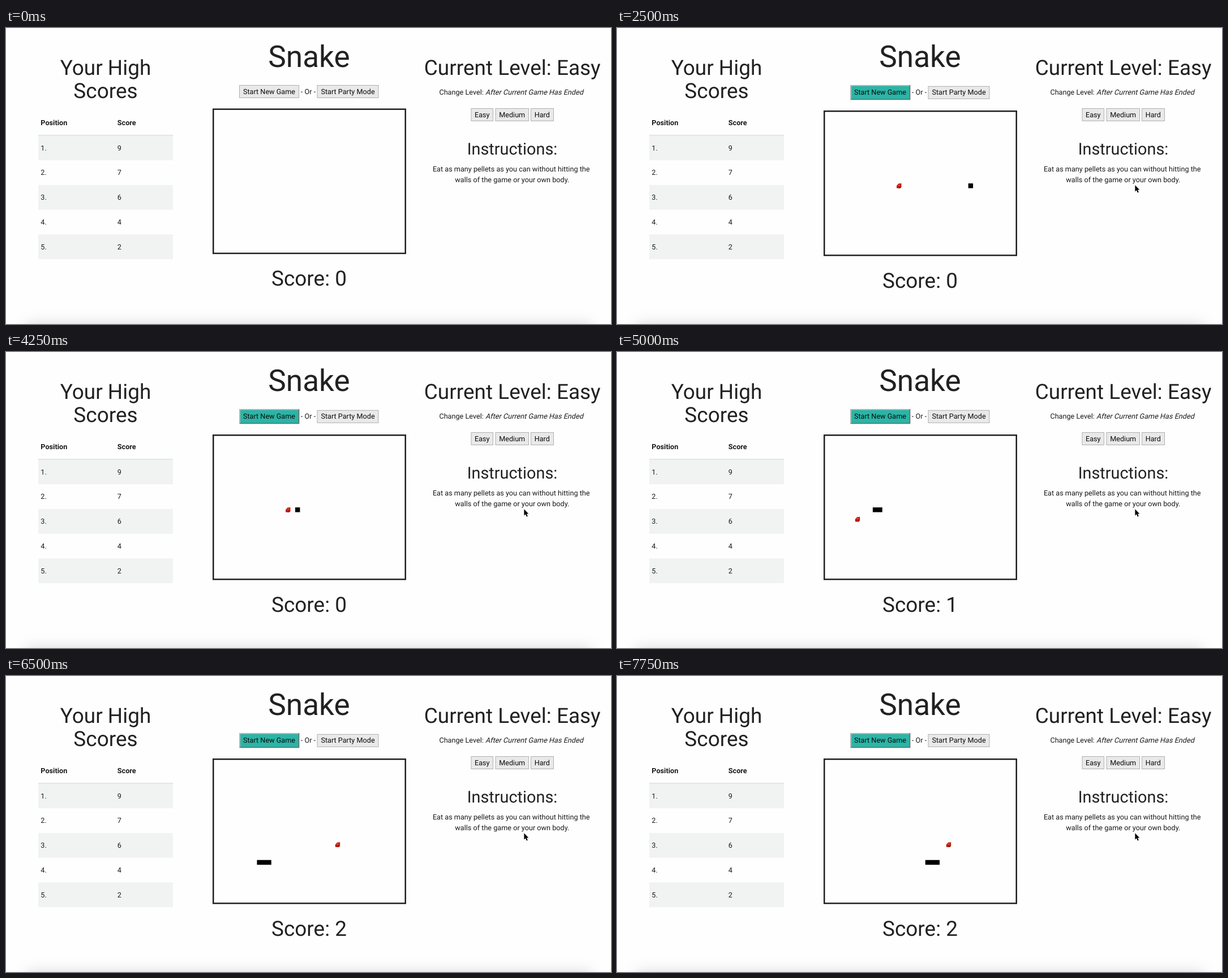
Write an HTML page that moves like this. It is 1069 px wide and 524 px high and loops after 8 s.

```html
<!DOCTYPE html>
<html lang="en">
<head>
<meta charset="utf-8">
<title>Snake</title>
<style>
  html, body { margin: 0; width: 100%; height: 100%; overflow: hidden; background: #fefefe; }
  svg { display: block; width: 100%; height: 100%; overflow: hidden; }
  text { font: 12.66px Roboto, sans-serif; fill: #1a1a1a; text-rendering: geometricPrecision; }
  .mid text { text-anchor: middle; }
  .mid .from { text-anchor: start; }
  .mid .h1 { font-size: 53.2px; }
  .mid .h3 { font-size: 36.97px; }
  .mid .h4 { font-size: 28.87px; }
  .h1, .h3, .h4 { fill: #212121; }
  .bold { font-weight: 700; }
  .stripe { fill: #f1f2f2; }
  .button rect { fill: #e9e9e9; stroke: #b0b0b0; }
  .button text { fill: #0c0c0c; }
  #start.active rect { fill: #2ab5a6; stroke: #66706f; stroke-width: 1.7; }
  #bevel { display: none; fill: none; stroke: #b4bbba; stroke-width: 1.7; }
  .active #bevel { display: inline; }
  #snake { fill: none; stroke: #000; stroke-width: 8.44; stroke-linecap: square; }
</style>
</head>
<body>
<svg viewBox="0 0 1069 524" preserveAspectRatio="xMinYMin">
  <filter id="blur" x="-10%" y="-100%" width="120%" height="300%"><feGaussianBlur stdDeviation="12"/></filter>
  <rect x="36" y="524" width="998" height="60" fill-opacity=".15" filter="url(#blur)"/>

  <g id="table"></g>
  <g class="mid">
    <text class="h3" x="176" y="83.2">Your High</text>
    <text class="h3" x="176" y="123.8">Scores</text>

    <text class="h1" x="535.5" y="68.7">Snake</text>
    <g id="start" class="button">
      <rect x="412.5" y="101.5" width="105" height="22"/>
      <path id="bevel" d="M413.3 126V101.8H517"/>
      <text x="465" y="116.5">Start New Game</text>
    </g>
    <g id="inline">
      <text x="534" y="116.5">- Or -</text>
      <g class="button">
        <rect x="550" y="101.5" width="108" height="22"/>
        <text x="604" y="116.5">Start Party Mode</text>
      </g>
    </g>
    <g id="game">
      <rect x="366.25" y="143.75" width="339.5" height="255.2" fill="none" stroke="#1e1e1e" stroke-width="2.5"/>
      <text id="score" class="h3" x="535.5" y="456.1">Score: 0</text>
    </g>

    <text class="h3" x="894.7" y="83.2">Current Level: Easy</text>
    <text class="from" x="765.4" y="118.4">Change Level:</text>
    <text class="from" transform="translate(847 118.4) skewX(-14)">After Current Game Has Ended</text>
    <g class="button"><rect x="822" y="142.5" width="38.5" height="22"/><text x="841.3" y="157.8">Easy</text></g>
    <g class="button"><rect x="865" y="142.5" width="58.5" height="22"/><text x="894.2" y="157.8">Medium</text></g>
    <g class="button"><rect x="927.5" y="142.5" width="40" height="22"/><text x="947.3" y="157.8">Hard</text></g>
    <text class="h4" x="894.5" y="223.7">Instructions:</text>
    <text x="892.7" y="254">Eat as many pellets as you can without hitting the</text>
    <text x="894.3" y="272.6">walls of the game or your own body.</text>
  </g>

  <g id="pellet">
    <path d="M-4.2 4.2V0L-1-3.8 4.2-4.2V2L2.4 4.2Z" fill="#bd1a0c"/>
    <path d="M-3.4 4.2L1 3.2 4.2 2 2.4 4.2Z" fill="#7d1008"/>
    <path d="M-1.6-.6L1.8-1.6" stroke="#e8796c" stroke-width="1.1"/>
  </g>
  <path id="snake"/>
  <path id="cursor" d="M0 0V11.3L2.6 9 4.5 13.3 6.4 12.4 4.6 8.2H8Z" stroke="#fff" stroke-width="1" paint-order="stroke"/>
</svg>
<script>
const LOOP = 8000, STEP = 250, CELL = 8.44;
const FIELD = { x: 367.5, y: 148.5 };
const HOVER_AT = 750, GAME_AT = 1750, MOVE_AT = 3000;
const FIRST_MEAL = 15, SECOND_MEAL = 26;
const cursorStops = [
  [500, 501, 77], [750, 504, 95], [1000, 506.3, 102.8], [1250, 508, 112],
  [2000, 640, 165], [2250, 850, 250], [2500, 915.4, 278.3]
];
const pellets = [[498.3, 279.3], [425, 296], [586, 298.5]];
const el = id => document.getElementById(id);

function buildTable() {
  const top = 190.3, pitch = 43.8;
  const cells = (y, a, b, cls = '') =>
    `<text class="${cls}" x="61.3" y="${y}">${a}</text><text class="${cls}" x="196.8" y="${y}">${b}</text>`;
  const rows = [9, 7, 6, 4, 2].map((score, i) => {
    const y = top + i * pitch;
    const stripe = i % 2 ? '' : `<rect class="stripe" x="57" y="${y}" width="238" height="${pitch}"/>`;
    return stripe + cells(y + 26.3, `${i + 1}.`, score);
  });
  el('table').innerHTML = cells(172, 'Position', 'Score', 'bold') + rows.join('') +
    '<rect x="57" y="189.3" width="238" height="1" fill="#d2d3d3"/>';
}

// The route runs left, then down, then right.
function routePoint(i) {
  const [col, row] = i <= 24 ? [30 - i, 15] : i <= 30 ? [6, i - 9] : [i - 24, 21];
  return `${FIELD.x + (col + .5) * CELL} ${FIELD.y + (row + .5) * CELL}`;
}

function place(node, x, y) {
  node.setAttribute('transform', `translate(${x} ${y})`);
}

function show(node, visible) {
  node.style.display = visible ? '' : 'none';
}

function render(time) {
  const t = Math.floor(time % LOOP / STEP) * STEP;
  const hovered = t >= HOVER_AT, playing = t >= GAME_AT;

  const start = el('start'), box = start.querySelector('rect');
  start.classList.toggle('active', hovered);
  box.setAttribute('x', hovered ? 413.3 : 412.5);
  box.setAttribute('y', hovered ? 101.8 : 101.5);
  box.setAttribute('width', hovered ? 104.2 : 105);
  box.setAttribute('height', hovered ? 24.6 : 22);
  start.querySelector('text').setAttribute('y', hovered ? 118.3 : 116.5);
  place(el('inline'), 0, hovered ? 1.8 : 0);
  place(el('game'), 0, hovered ? 3.5 : 0);

  const stop = cursorStops.filter(s => s[0] <= t).pop();
  show(el('cursor'), stop);
  if (stop) place(el('cursor'), stop[1], stop[2]);

  const moved = t < MOVE_AT ? 0 : Math.floor(13.6 + 2.43 * (t - 4250) / STEP);
  const score = (moved >= FIRST_MEAL) + (moved >= SECOND_MEAL);
  el('score').textContent = `Score: ${score}`;
  show(el('pellet'), playing);
  show(el('snake'), playing);
  place(el('pellet'), ...pellets[score]);
  const body = Array.from({ length: score + 1 }, (_, k) => routePoint(moved - k));
  el('snake').setAttribute('d', `M${body[0]}L${body.join('L')}`);
}

buildTable();
const began = performance.now();
function tick() {
  render(performance.now() - began);
  requestAnimationFrame(tick);
}
tick();
</script>
</body>
</html>
```
